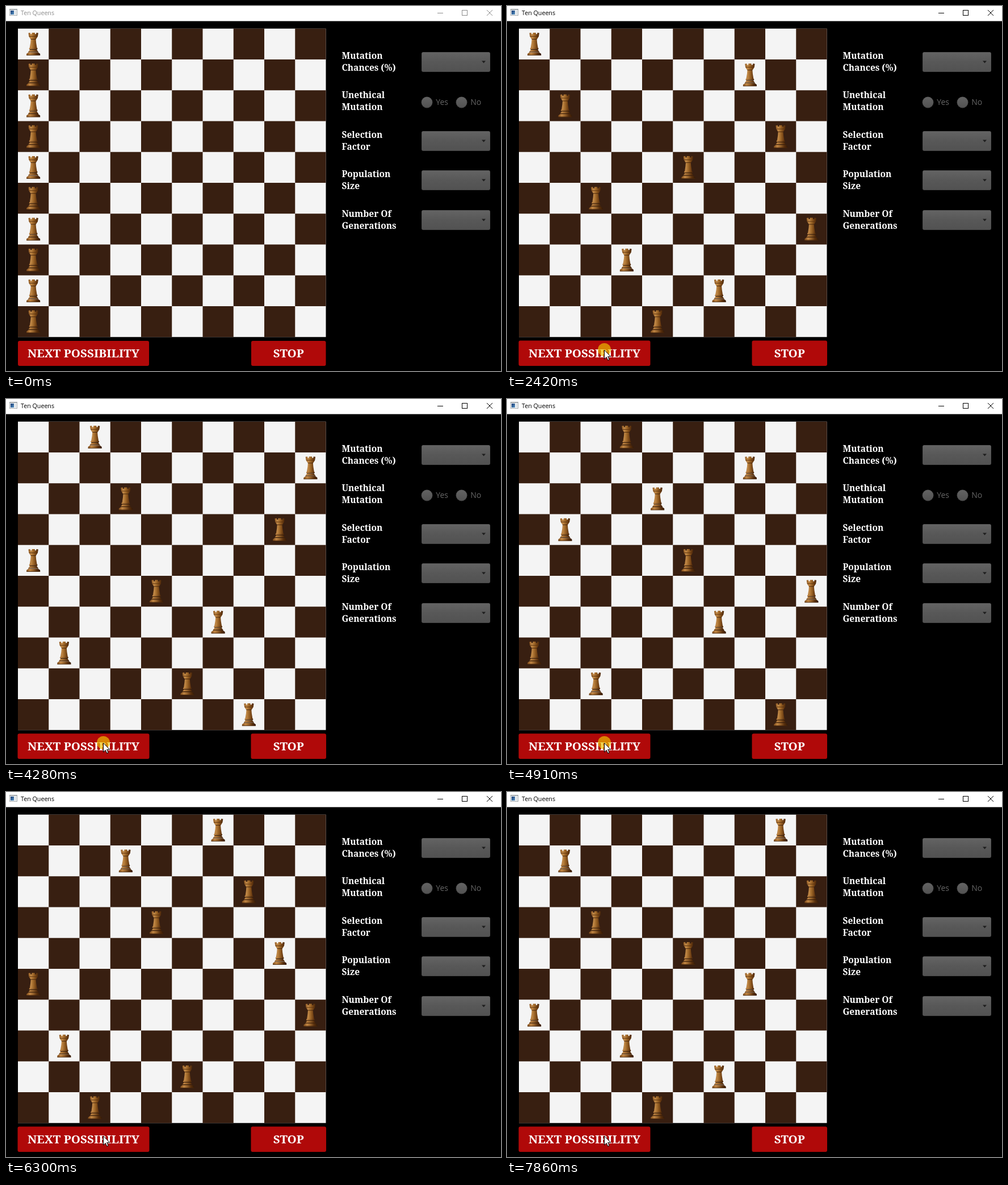
Recreate the animation shown at these times as an HTML page with a canvas. Size 872 px wide and 642 px high, loop 8000 ms.

```html
<!DOCTYPE html>
<html lang="en">
<head>
<meta charset="utf-8">
<title>Ten Queens</title>
<style>
html, body { margin: 0; width: 100%; height: 100%; overflow: hidden; background: #000; }
canvas { display: block; }
</style>
</head>
<body>
<canvas id="stage" width="872" height="642"></canvas>
<script>
const ctx = document.getElementById('stage').getContext('2d');
const LOOP = 8000, SIZE = 10, CELL = 54.25, LEFT = 21, TOP = 39.75;
const SERIF = '"Noto Serif", serif', SANS = '"Open Sans", sans-serif';
const LIGHT = '#f4f4f4', DARK = '#381f11';

// Each press shows the next board shortly after; slow presses are held longer.
const PRESSES = [1560, 2420, 3190, 4280, 4910, 5520, 6150, 6760, 7780];
const HOLDS = [80, 150, 170, 90, 80, 80, 150, 90, 80];
const LABELS = [
  ['Mutation', 'Chances (%)'], ['Unethical', 'Mutation'], ['Selection', 'Factor'],
  ['Population', 'Size'], ['Number Of', 'Generations']
];

// Backtracking over columns from `start`, trying rows cyclically after the previous queen.
function solve(start) {
  const rows = [];
  const place = (n, previous) => {
    if (n === SIZE) return true;
    const col = (start + n) % SIZE;
    for (let step = 1; step <= SIZE; step++) {
      const row = (previous + step) % SIZE;
      if (!rows.every((r, c) => r !== row && Math.abs(r - row) !== Math.abs(c - col))) continue;
      rows[col] = row;
      if (place(n + 1, row)) return true;
      delete rows[col];
    }
    return false;
  };
  place(0, -1);
  return rows.map((row, col) => [col, row]);
}
const initial = Array.from({ length: SIZE }, (_, row) => [0, row]);
const boards = [initial, ...PRESSES.map((_, i) => solve(i))];

function rect(x, y, w, h, fill) {
  ctx.fillStyle = fill;
  ctx.fillRect(x, y, w, h);
}

function rounded(x, y, w, h, r, fill) {
  ctx.fillStyle = fill;
  ctx.beginPath();
  ctx.roundRect(x, y, w, h, r);
  ctx.fill();
}

function disc(x, y, r, fill) {
  ctx.fillStyle = fill;
  ctx.beginPath();
  ctx.arc(x, y, r, 0, Math.PI * 2);
  ctx.fill();
}

function text(str, x, y, font, fill, align = 'left') {
  ctx.font = font;
  ctx.fillStyle = fill;
  ctx.textAlign = align;
  ctx.fillText(str, x, y);
}

function polygon(points, fill, stroke) {
  ctx.beginPath();
  points.forEach(([x, y]) => ctx.lineTo(x, y));
  ctx.closePath();
  ctx.fillStyle = fill;
  ctx.fill();
  if (stroke) {
    ctx.strokeStyle = stroke;
    ctx.lineWidth = 1;
    ctx.stroke();
  }
}

// Shape symmetric about x = 0, given its right side from top to bottom.
function mirrored(side, fill) {
  polygon([...side, ...side.map(([x, y]) => [-x, y]).reverse()], fill);
}

function gradient(x0, y0, x1, y1, ...colors) {
  const g = ctx.createLinearGradient(x0, y0, x1, y1);
  colors.forEach((c, i) => g.addColorStop(i / (colors.length - 1), c));
  return g;
}

function line(...points) {
  ctx.beginPath();
  points.forEach(([x, y]) => ctx.lineTo(x, y));
  ctx.stroke();
}

function titleBar(active) {
  const ink = active ? '#000' : '#8c8c8c';
  rect(0, 0, 872, 26.6, '#fff');
  rect(6, 5, 14, 12, '#a3a9ad');
  rect(7, 7, 12, 9, '#f5f7f8');
  rect(8, 8, 6, 7, gradient(8, 8, 14, 15, '#1f3f78', '#4f8fc0'));
  rect(15, 8, 3, 7, '#dfe4e8');
  text('Ten Queens', 26, 16, '10.7px ' + SANS, ink);
  ctx.strokeStyle = ink;
  ctx.lineWidth = 1;
  line([760, 12.5], [770, 12.5]);
  ctx.strokeRect(803.5, 7.5, 9, 9);
  line([847, 7], [857, 17]);
  line([857, 7], [847, 17]);
}

function combo(y) {
  rounded(732, y, 121, 35, 3, '#464646');
  rounded(732.5, y + .5, 120, 33.5, 2.5, gradient(0, y, 0, y + 34, '#646464', '#585858', '#525252'));
  polygon([[838, y + 15.5], [845, y + 15.5], [841.5, y + 19.5]], '#1d1d1d');
}

function radio(x, label) {
  disc(x, 169.5, 10, '#454545');
  disc(x, 169.3, 9.2, gradient(0, 160, 0, 179, '#636363', '#525252'));
  text(label, x + 15.8, 174, '14px ' + SANS, '#666');
}

function panel() {
  LABELS.forEach((lines, i) => {
    const y = 81 + i * 69.4;
    lines.forEach((str, n) =>
      text(str, 591.4, Math.round(y + 12 + n * 21), 'bold 15.5px ' + SERIF, '#fff'));
    if (i !== 1) combo(Math.round(y));
  });
  radio(741.5, 'Yes');
  radio(802.5, 'No');
}

function button(x, w, label, active) {
  const grow = active ? .5 : 0;
  rounded(x - grow, 589 - grow, w + 2 * grow, 44 + grow, 3, '#b00909');
  text(label, x + w / 2, 618, 'bold 20.6px ' + SERIF, '#fff', 'center');
}

function rook(col, row) {
  ctx.save();
  ctx.translate(LEFT + (col + .5) * CELL, TOP + row * CELL + .3);
  const wood = gradient(-9, 0, 10, 0, '#8a541f', '#c28a48', '#9b6426', '#6b3c12', '#3c1f08');
  const base = gradient(-12, 0, 12, 0, '#7d4b1b', '#c08543', '#93602a', '#5a300d', '#351a06');
  // Tapered body and crown
  mirrored([[4.3, 17], [5, 25], [6.8, 36]], wood);
  mirrored([[2.6, 7], [2.8, 9.5], [5, 9.3], [5.3, 7], [8.7, 7.5], [7.8, 13.5], [5, 18]], wood);
  rect(-7.4, 13, 14.8, .9, '#5a310e');
  rect(-4.6, 18, 9.2, .9, '#42220a');
  // Collar and stepped foot
  rounded(-7.4, 33.8, 14.8, 2.4, 1, base);
  rect(-6.5, 36, 13, 1.2, '#301806');
  mirrored([[6, 37], [8.8, 40.5]], base);
  rect(-8.8, 40.3, 17.6, 1.1, '#3a1e09');
  mirrored([[8.5, 41.4], [12, 44], [12, 46.8]], base);
  rect(-12, 46, 24, .9, '#48270c');
  ctx.restore();
}

function board(pieces) {
  rect(LEFT, TOP, SIZE * CELL, SIZE * CELL, LIGHT);
  for (let row = 0; row < SIZE; row++) {
    for (let col = 1 - row % 2; col < SIZE; col += 2) {
      rect(LEFT + col * CELL, TOP + row * CELL, CELL, CELL, DARK);
    }
  }
  pieces.forEach(([col, row]) => rook(col, row));
}

function cursor(t) {
  if (t < 450) return;
  const u = Math.min(6, Math.floor((t - 450) / 81.6)) / 6, v = 1 - u;
  const ease = u * u * (3 - 2 * u);
  const x = 648 + (171.5 - 648) * ease;
  const y = 628 * v * v + 2 * 575 * u * v + 605 * u * u;
  const arrow = [[0, 0], [0, 16], [3.7, 12.6], [6.3, 18.2], [8.7, 17.1], [6.2, 11.6], [11, 11.4]];
  polygon(arrow.map(([dx, dy]) => [x + dx, y + dy]), '#fff', '#000');
}

function draw(t) {
  const active = t >= PRESSES[0];
  const solved = PRESSES.filter((press, i) => t >= press + Math.min(HOLDS[i], 150)).length;
  // Long holds update the board before the release.
  const shown = PRESSES.filter((press, i) => t >= press + (HOLDS[i] > 150 ? 120 : HOLDS[i])).length;
  rect(0, 0, 872, 642, '#000');
  titleBar(active);
  board(boards[Math.max(solved, shown)]);
  panel();
  button(21, 231, 'NEXT POSSIBILITY', active);
  button(432, 131.5, 'STOP', active);
  if (PRESSES.some((press, i) => t >= press && t < press + HOLDS[i])) {
    disc(171.5, 604.5, 11.5, 'rgba(238, 200, 0, .65)');
  }
  cursor(t);
}

function tick() {
  draw(performance.now() % LOOP);
  requestAnimationFrame(tick);
}
tick();
</script>
</body>
</html>
```
